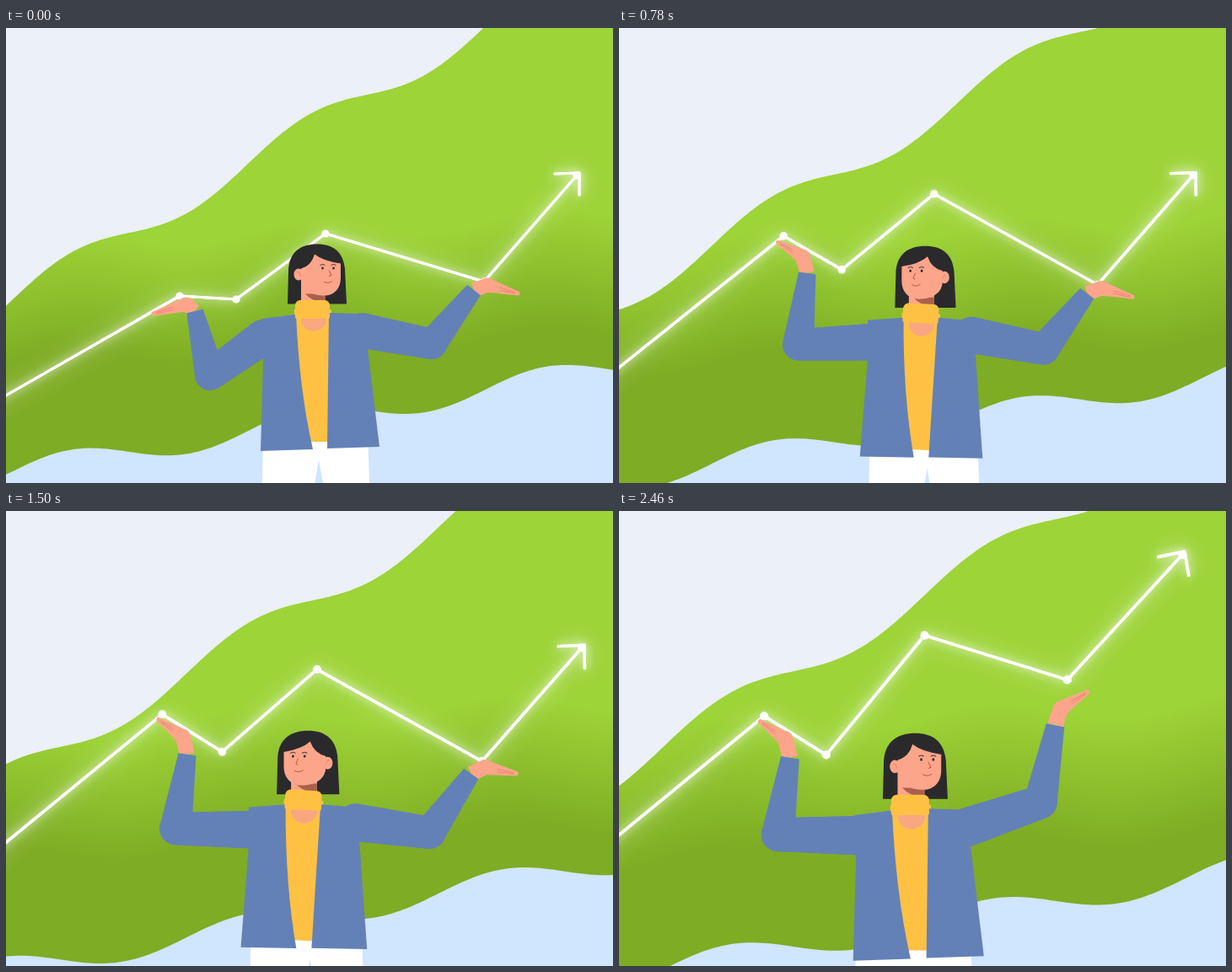
Animation of 720x540 px, one loop 2.49 s. Source, as an HTML page with a canvas:

```html
<!DOCTYPE html>
<html lang="en">
<head>
<meta charset="utf-8">
<title>Rising trend</title>
<style>
  html, body { margin: 0; width: 100%; height: 100%; overflow: hidden; background: #ebf0f9; }
  canvas { display: block; width: 720px; height: 540px; }
</style>
</head>
<body>
<canvas id="stage" width="720" height="540"></canvas>
<script>
const ctx = document.getElementById('stage').getContext('2d');
const W = 720, H = 540, LOOP = 2490, STEP = 30;
const SKIN = '#fca58a', CREASE = '#dc7c66', HAIR = '#2a2a2c', JACKET = '#6381b7', YELLOW = '#ffc143';

// Joints of each arm, lowered and raised
const LEFT = {
  shoulder: [305, 367],
  elbow: [[242, 412], [221, 366]],
  wrist: [[224, 336], [234, 283]],
  palm: [[214, 328], [229, 263]],
  tip: [[175, 339], [202, 244]]
};
const RIGHT = {
  shoulder: [422, 359],
  elbow: [[505, 375], [504, 331]],
  wrist: [[555, 311], [520, 248]],
  palm: [[571, 305], [526, 230]],
  tip: [[607, 315], [555, 212]]
};

const mix = (a, b, k) => a + (b - a) * k;
const between = (a, b, k) => [mix(a[0], b[0], k), mix(a[1], b[1], k)];
const ease = (t, start, length) => {
  const u = Math.min(1, Math.max(0, (t - start) / length));
  return u < .5 ? 4 * u ** 3 : 1 - 4 * (1 - u) ** 3;
};

function fill(d, color) {
  ctx.fillStyle = color;
  ctx.fill(new Path2D(d));
}

function oval(x, y, rx, ry, color, end = 7) {
  ctx.beginPath();
  ctx.ellipse(x, y, rx, ry, 0, 0, end);
  ctx.fillStyle = color;
  ctx.fill();
}

function stroke(d, color, width) {
  ctx.strokeStyle = color;
  ctx.lineWidth = width;
  ctx.stroke(new Path2D(d));
}

// Tapered limb: round at the first end, flat at the second
function limb([x, y], r, [X, Y], R, color) {
  const a = Math.atan2(Y - y, X - x) + Math.PI / 2;
  const nx = R * Math.cos(a), ny = R * Math.sin(a);
  ctx.beginPath();
  ctx.arc(x, y, r, a, a + Math.PI);
  ctx.lineTo(X - nx, Y - ny);
  ctx.lineTo(X + nx, Y + ny);
  ctx.fillStyle = color;
  ctx.fill();
}

function drawHills(t) {
  const phase = 287 + .152 * t;
  const wave = x => -Math.sin(2 * Math.PI * (x - phase) / 282);
  const top = x => 328 - .581 * x + 16.5 * wave(x);
  const low = x => 528.5 - .175 * x + 14.5 * wave(x);

  // Everything below a curve, down to the bottom of the stage
  const below = curve => {
    ctx.beginPath();
    for (let x = -4; x <= W + 4; x += 4) ctx.lineTo(x, curve(x));
    ctx.lineTo(W + 4, H);
    ctx.lineTo(-4, H);
  };

  ctx.save();
  below(top);
  ctx.clip();
  const shade = ctx.createLinearGradient(0, 258, 0, 398);
  shade.addColorStop(0, '#9dd437');
  shade.addColorStop(1, '#7eac24');
  ctx.fillStyle = shade;
  for (let x = 0; x < W; x += 2) {
    const shift = 12 * wave(x) - .05 * x;
    ctx.translate(0, shift);
    ctx.fillRect(x, -100, 3, H + 200);
    ctx.translate(0, -shift);
  }
  ctx.restore();
  below(low);
  ctx.fillStyle = '#d0e5fe';
  ctx.fill();
}

function drawChart(up, both) {
  const tip = [677 - 20 * both, 175 - 111 * both];
  const dots = [
    [206, 318 - 80 * up],
    [273, 322 - 42 * up],
    [379, 244 - 52 * up - 41 * both],
    [567 - 34 * both, 301 - 102 * both],
    tip
  ];
  const line = 'M' + [[-206, 554 + 22 * up], ...dots].join('L');
  ctx.save();
  ctx.shadowColor = '#fff';
  ctx.lineCap = ctx.lineJoin = 'round';
  for (const blur of [28, 11]) {
    ctx.shadowBlur = blur;
    stroke(line, '#fff', 3.2);
    ctx.save();
    ctx.translate(...tip);
    ctx.rotate(-.17 * both);
    stroke('M-26-2L3-3V23', '#fff', 3.2);
    ctx.restore();
  }
  ctx.shadowBlur = 0;
  for (const [x, y] of dots) oval(x, y, 4.6, 4.6, '#fff');
  ctx.restore();
}

function drawArm(arm, raise) {
  const [elbow, wrist, palm, tip] =
    ['elbow', 'wrist', 'palm', 'tip'].map(j => between(...arm[j], raise));
  limb(palm, 8.5, wrist, 8.5, SKIN);
  limb(tip, 2.5, palm, 8.5, SKIN);
  for (const dy of [-1, 2]) {
    const a = between(palm, tip, .4), b = between(palm, tip, .92);
    stroke(`M${a[0]} ${a[1] + dy}L${b[0]} ${b[1] + dy / 2}`, CREASE, .7);
  }
  limb(elbow, 18, wrist, 10, JACKET);
  limb(elbow, 18, arm.shoulder, 21, JACKET);
  limb(arm.shoulder, 21, elbow, 18, JACKET);
}

// side: 0 looks right, 1 looks left
function drawHead(side) {
  const turn = 1 - 2 * side, slide = (a, b) => mix(a, b, side);
  ctx.save();
  ctx.translate(369, 292.5);
  fill('M-35 35L-34-3C-34-27-19-36 0-36C19-36 31-27 33-7L35 35Z', HAIR);
  fill('M-19 0H10V40H-19Z', SKIN);
  fill('M-14 23H10V34Q-5 33-14 23Z', '#a9614c');
  for (const s of [-1, 1]) {
    if (s * turn > 0) continue;
    oval(s * 22, 0, 5.5, 7, SKIN);
    stroke(`M${s * 24}-3Q${s * 20}-3 ${s * 20} 2`, CREASE, .8);
  }

  const l = slide(-19, -28), r = slide(28, 19), peak = slide(-3, 3);
  fill(`M${l} ${slide(-7, -13)}Q${peak - slide(4, 10)} ${slide(-10, -16)} ${peak} -24` +
    `Q${peak + slide(10, 4)} ${slide(-16, -10)} ${r} ${slide(-13, -7)}L${r} 4` +
    `C${r} 18 ${slide(19, 7)} 25 ${slide(9, -9)} 25` +
    `C${slide(-7, -19)} 25 ${l} 18 ${l} 4Z`, SKIN);

  const c = 13 * turn;
  for (const x of [c - 6.5, c + 6.5]) {
    oval(x, -7.5, 1.3, 1.6, HAIR);
    stroke(`M${x - 3}-11Q${x}-13 ${x + 3}-11`, HAIR, .9);
  }
  stroke(`M${c + turn}-5L${c + 4 * turn} 1L${c + turn} 2` +
    `M${c - 5} 8.5Q${c} 11.5 ${c + 5} 8`, '#b9523f', .9);
  ctx.restore();
}

function drawTorso(side) {
  ctx.save();
  ctx.translate(365, 338);
  ctx.rotate(.056 * side);
  ctx.translate(-365, -338);
  fill('M342 334H386V491H342Z', YELLOW);
  oval(365, 345, 15, 15, '#f9a781', Math.PI);
  fill('M344 340Q348 430 364 500L302 502L305 397L303 345Z', JACKET);
  fill('M383 338L418 339L429 381L443 497L381 499Z', JACKET);
  ctx.beginPath();
  ctx.roundRect(343, 323, 41, 22, [6, 6, 2, 2]);
  ctx.fillStyle = YELLOW;
  ctx.fill();
  ctx.restore();
}

function draw(now) {
  const t = Math.floor(now % LOOP / STEP) * STEP;
  const up = ease(t, 250, 735), both = ease(t, 1270, 780);
  const z = 1 + .1 * t / 2460;
  ctx.setTransform(1, 0, 0, 1, 0, 0);
  ctx.fillStyle = '#ebf0f9';
  ctx.fillRect(0, 0, W, H);

  // Slow camera push about one point
  ctx.translate(545, 185);
  ctx.scale(z, z);
  ctx.translate(-545, -185);
  drawHills(t);
  drawChart(up, both);
  fill('M305 488H429L433 580H383L371 512L360 580H303Z', '#fff');
  drawHead(up - both);
  drawArm(LEFT, up);
  drawArm(RIGHT, both);
  drawTorso(up - both);
}

let start;
function tick(now) {
  start ??= now;
  draw(now - start);
  requestAnimationFrame(tick);
}
draw(0);
requestAnimationFrame(tick);
</script>
</body>
</html>
```
